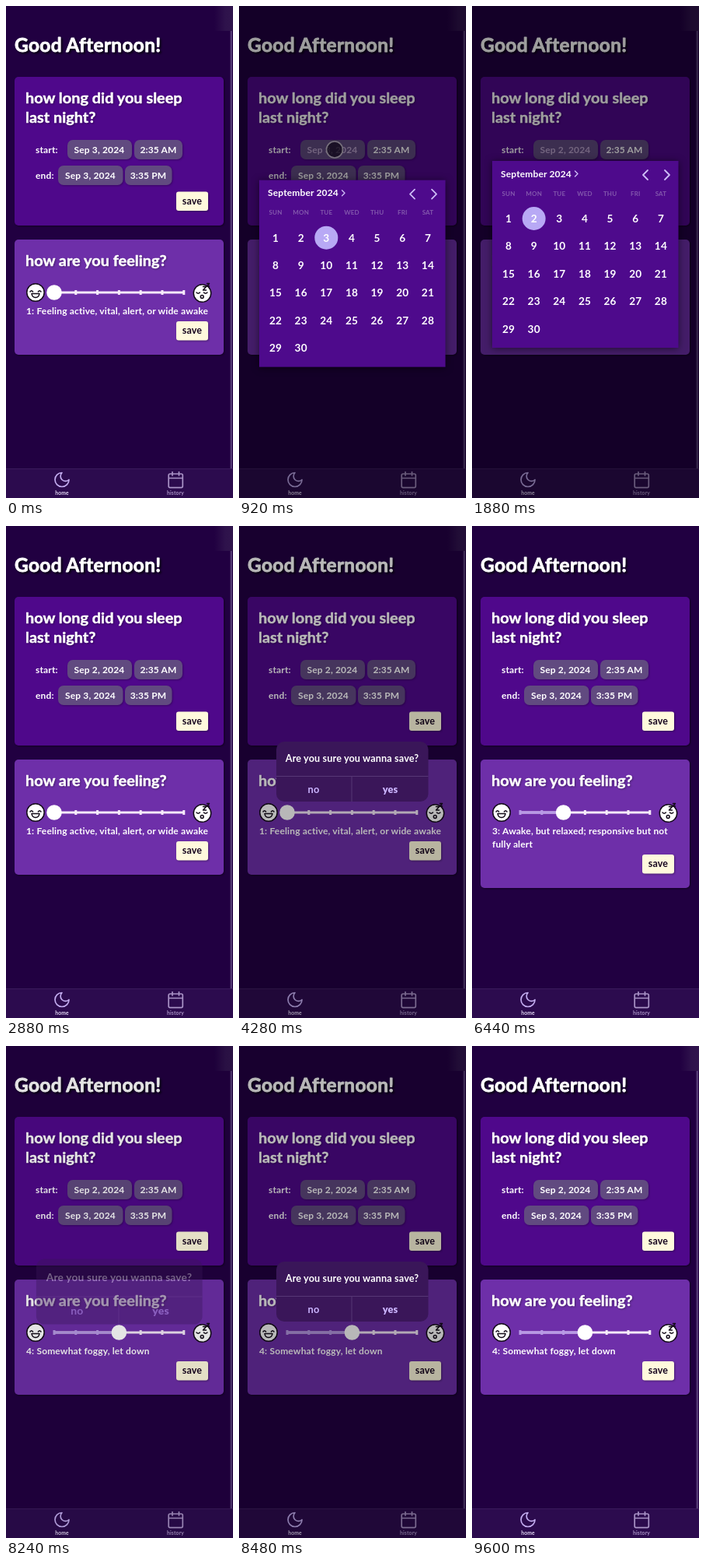
Recreate the animation shown at these times as an HTML page. Size 292x632 px, loop 9640 ms.

```html
<!DOCTYPE html>
<html lang="en">
<head>
<meta charset="utf-8">
<title>Sleep diary</title>
<style>
  html, body { margin: 0; width: 100%; height: 100%; overflow: hidden; background: #210041; }
  svg { display: block; width: 292px; height: 632px; }
  text { font: 700 12px Lato, sans-serif; letter-spacing: .15px; fill: #fff; white-space: pre; }
  .mid { text-anchor: middle; }
  .title, .head { stroke: #fff; stroke-linejoin: round; }
  .title { font-size: 24.5px; letter-spacing: .3px; stroke-width: .8; filter: drop-shadow(2px 2px 1px #000a); }
  .head { font-size: 19.9px; letter-spacing: 0; stroke-width: .5; filter: drop-shadow(1px 1px 1px #0005); }
  .pill { fill: #614a80; filter: drop-shadow(1px 1px 1px #0004); }
  .card { filter: drop-shadow(1px 1px 1px #0007); }
  .save rect { fill: #fff9dd; filter: drop-shadow(1px 1px 1px #0005); }
  .save text { fill: #16051f; font-size: 12.5px; }
  .line { fill: none; stroke-linecap: round; stroke-linejoin: round; }
  .tab text { font-size: 6.8px; }
  .week { font-size: 8px; fill: #8358ad; }
  .day { font-size: 13.6px; }
  .choice { font-size: 12.8px; fill: #cbb5ff; }
</style>
</head>
<body>
<svg viewBox="0 0 292 632">
  <defs>
    <linearGradient id="fade">
      <stop offset="0" stop-color="#341a50" stop-opacity="0"/>
      <stop offset=".6" stop-color="#341a50" stop-opacity=".7"/>
      <stop offset="1" stop-color="#341a50" stop-opacity=".8"/>
    </linearGradient>
    <g id="save" class="save">
      <rect x="219" y="0" width="41" height="24.5" rx="3"/>
      <text class="mid" x="239.5" y="16.3">save</text>
    </g>
  </defs>

  <rect width="292" height="632" fill="#210041"/>
  <text class="title" x="11" y="59">Good Afternoon!</text>

  <rect class="card" x="11" y="91" width="269" height="191" rx="5" fill="#4f088b"/>
  <text class="head" x="25" y="125">how long did you sleep</text>
  <text class="head" x="25" y="150">last night?</text>
  <text x="38" y="188.5">start:</text>
  <rect class="pill" x="79" y="172" width="83" height="25" rx="7"/>
  <text class="mid" id="startDate" x="120" y="188.5"></text>
  <rect class="pill" x="165" y="172" width="62" height="25" rx="7"/>
  <text class="mid" x="196" y="188.5">2:35 AM</text>
  <text x="38" y="221.5">end:</text>
  <rect class="pill" x="67" y="205" width="83.5" height="25" rx="7"/>
  <text class="mid" x="108.5" y="221.5">Sep 3, 2024</text>
  <rect class="pill" x="153" y="205" width="60.5" height="25" rx="7"/>
  <text class="mid" x="183" y="221.5">3:35 PM</text>
  <use href="#save" y="238.5"/>

  <rect class="card" id="moodCard" x="11" y="300" width="269" height="148" rx="5" fill="#6e2fa9"/>
  <text class="head" x="25" y="334">how are you feeling?</text>
  <g id="slider"></g>
  <circle id="thumb" cy="368" r="9.8" fill="#fff"/>
  <g class="line" stroke="#120a18" stroke-width="1.5">
    <circle cx="38" cy="368" r="11.2" fill="#fff"/>
    <path d="M31 367q1.800-2.600 3.600 0M41.400 367q1.800-2.600 3.600 0"/>
    <path d="M33 369.500h10q-.8 5-5 5t-5-5z"/>
    <circle cx="252.5" cy="369" r="11.2" fill="#fff"/>
    <path d="M245 368q2.200 2.400 4.400 0M254.500 368q2.200 2.400 4.400 0"/>
    <circle cx="252.2" cy="373.5" r="1.9"/>
    <path d="M253.500 360.500h4l-4 4.500h4M258.500 356.500h3l-3 3.500h3"/>
  </g>
  <text id="note1" x="26" y="396"></text>
  <text id="note2" x="26" y="412.5"></text>
  <use href="#save" id="moodSave"/>

  <rect y="594" width="292" height="38" fill="#2c0b4e"/>
  <path d="M0 594.5H292" stroke="#3b1b5c"/>
  <g class="tab">
    <path class="line" stroke="#c3adf0" stroke-width="1.7" d="M72 599.5a6 6 0 0 0 9 9 9 9 0 1 1-9-9z"/>
    <text class="mid" x="72" y="628" style="fill:#e2d6f4">home</text>
    <path class="line" stroke="#a993c6" stroke-width="1.7"
      d="M211 601h14.5q1.800 0 1.800 1.800v14q0 1.800-1.800 1.800h-14.500q-1.800 0-1.800-1.800v-14q0-1.800 1.800-1.800zM209.300 606.500h18M214 598.500v4.500M222.500 598.500v4.500"/>
    <text class="mid" x="218" y="628" style="fill:#a993c6">history</text>
  </g>
  <g id="scrollbar">
    <rect x="268" width="24" height="32" fill="url(#fade)"/>
    <rect x="288.5" y="32" width="2.5" height="562" fill="#553a75"/>
  </g>

  <rect id="dim" width="292" height="632"/>
  <circle id="touch" cx="123" cy="184.5" r="10.5" fill="#0c0414" fill-opacity=".7" stroke="#77717c" stroke-width="1.6"/>

  <g id="calendar">
    <rect x="26" width="239.5" height="240" fill="#4e0a8c" style="filter:drop-shadow(0 1px 5px #0008)"/>
    <text x="37" y="20.5">September 2024</text>
    <g class="line" stroke="#cdbcf6" stroke-width="1.8">
      <path stroke-width="1.4" d="M132.500 13l3.500 3.500-3.500 3.500"/>
      <path d="M226 12l-6 6 6 6M248 12l6 6-6 6"/>
    </g>
    <circle id="chosen" cy="74" r="15" fill="#b8a9f5"/>
    <g id="days"></g>
  </g>

  <g id="dialog">
    <rect x="48" y="277" width="195.5" height="77" rx="10" fill="#3a1659"/>
    <path d="M48 321.5H243.5M145 321.5V354" stroke="#573776" fill="none"/>
    <text class="mid" x="145.5" y="303" style="font-size:12.6px">Are you sure you wanna save?</text>
    <text class="mid choice" x="96" y="342.5">no</text>
    <text class="mid choice" x="194.5" y="342.5" style="font-weight:900">yes</text>
  </g>
</svg>
<script>
const LOOP = 9640;
const NOTES = [
  ['1: Feeling active, vital, alert, or wide awake', ''],
  ['2: Functioning at high levels, but not at', 'peak; able to concentrate'],
  ['3: Awake, but relaxed; responsive but not', 'fully alert'],
  ['4: Somewhat foggy, let down', '']
];
const $ = id => document.getElementById(id);
const set = (id, attrs) => Object.entries(attrs).forEach(([k, v]) => $(id).setAttribute(k, v));
const ramp = (t, from, to) => Math.min(1, Math.max(0, (t - from) / (to - from)));
const easeOut = p => 1 - (1 - p) ** 3;
const columnX = i => 47 + 32.65 * i;
const tickX = i => 62 + 27.8 * i;

let grid = '';
['SUN', 'MON', 'TUE', 'WED', 'THU', 'FRI', 'SAT'].forEach((name, i) => {
  grid += `<text class="mid week" x="${columnX(i)}" y="44.5">${name}</text>`;
});
for (let d = 0; d < 30; d++) {
  grid += `<text class="mid day" x="${columnX(d % 7)}" y="${79 + 35.4 * Math.floor(d / 7)}">${d + 1}</text>`;
}
$('days').innerHTML = grid;

const PALE = '#f6eafa', LILAC = '#b79ae6';
let track = `<path d="M62 368H229" stroke="${PALE}" stroke-width="2.8"/>
  <path id="filled" stroke="${LILAC}" stroke-width="2.8"/>`;
for (let i = 0; i < 7; i++) {
  track += `<rect class="tick" x="${tickX(i) - 1.5}" y="365" width="3" height="6"/>`;
}
$('slider').innerHTML = track;
const ticks = [...document.querySelectorAll('.tick')];

// Opacity and scale of the confirmation opened and closed at the given times.
function confirmState(t, open, close) {
  const shown = easeOut(ramp(t, open - 40, open + 240));
  return { alpha: shown * (1 - ramp(t, close - 40, close + 200)), scale: 1.15 - 0.15 * shown };
}

function drawCalendar(t) {
  const grow = easeOut(ramp(t, 540, 860));
  const alpha = ramp(t, 540, 800) * (1 - ramp(t, 2540, 2860));
  const scale = 0.3 + 0.7 * grow;
  const top = 224 - 25 * easeOut(ramp(t, 920, 1140));
  const picked = t >= 1840;
  set('calendar', {
    opacity: alpha,
    transform: `translate(120 184) scale(${scale}) translate(-120 ${top - 184})`
  });
  set('chosen', { cx: columnX(picked ? 1 : 2) });
  $('startDate').textContent = picked ? 'Sep 2, 2024' : 'Sep 3, 2024';
  $('startDate').style.fill = alpha > 0.5 ? '#b9a2cc' : '#fff';
  set('touch', { opacity: ramp(t, 560, 640) * (1 - ramp(t, 1290, 1360)) });
  return alpha;
}

function drawSlider(t) {
  const value = 0.5 * ramp(t, 6280, 6320) + 1.5 * ramp(t, 6320, 6440) + ramp(t, 6720, 6800);
  const level = (t >= 6320) + (t >= 6420) + (t >= 6760);
  const [first, second] = NOTES[level];
  const extra = second ? 17 : 0;
  const x = tickX(value);
  set('thumb', { cx: x });
  set('filled', { d: `M62 368H${x}` });
  ticks.forEach((tick, i) => tick.setAttribute('fill', i < value ? LILAC : PALE));
  $('note1').textContent = first;
  $('note2').textContent = second;
  set('moodCard', { height: 148 + extra });
  set('moodSave', { y: 405 + extra });
  set('scrollbar', { opacity: t >= 6080 && t < 7240 ? 0 : 1 });
}

function draw(t) {
  const calendarAlpha = drawCalendar(t);
  drawSlider(t);
  const { alpha, scale } = t < 7000 ? confirmState(t, 4040, 5280) : confirmState(t, 8240, 9360);
  set('dialog', {
    opacity: alpha,
    transform: `translate(145.5 315.5) scale(${scale}) translate(-145.5 -315.5)`
  });
  set('dim', { opacity: 0.38 * calendarAlpha + 0.28 * alpha });
}

const start = performance.now();
function tick(now) {
  draw(Math.max(0, now - start) % LOOP);
  requestAnimationFrame(tick);
}
draw(0);
requestAnimationFrame(tick);
</script>
</body>
</html>
```
